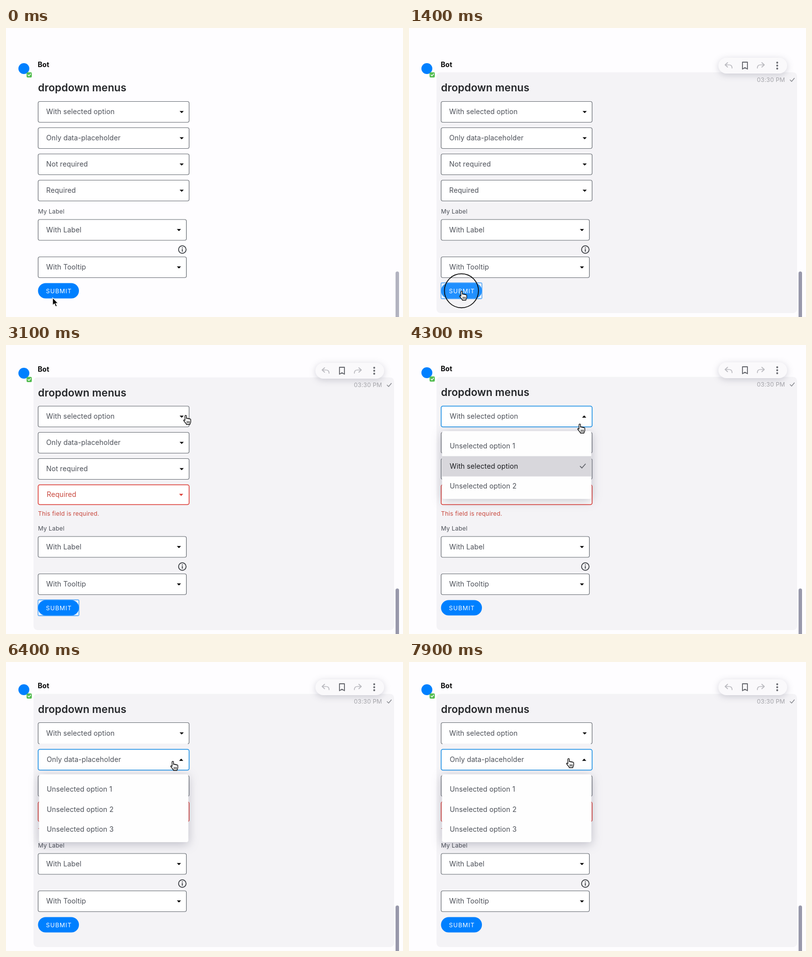
These frames come from a looping animation (800 px wide and 584 px high, 8000 ms). An HTML page:

```html
<!DOCTYPE html>
<html lang="en">
<head>
<meta charset="utf-8">
<title>Dropdown menus</title>
<style>
html, body { margin: 0; width: 100%; height: 100%; overflow: hidden; background: #fefdff; }
svg { display: block; width: 100%; height: 100%; }
text { font: 14px Inter, "Open Sans", sans-serif; letter-spacing: .1px; white-space: pre; }
.small { font-size: 12px; letter-spacing: .2px; }
.name { font-weight: 700; }
.title { font-size: 21px; font-weight: 600; }
.button { font-size: 12px; letter-spacing: 1px; }
.line { fill: none; stroke-linecap: round; stroke-linejoin: round; }
.bar { filter: drop-shadow(0 3px 7px rgba(40, 40, 70, .2)); }
.menu { filter: drop-shadow(0 4px 10px rgba(40, 40, 70, .27)); }
</style>
</head>
<body>
<svg id="stage" viewBox="0 0 800 584"></svg>
<script>
const stage = document.getElementById('stage');
const LOOP = 8000, STEP = 100;
const INK = '#4c5058', EDGE = '#676c73', RED = '#dc3b34', BLUE = '#0080ff', FOCUS = '#158ce4';

// Moments of the story, in ms
const HOVER = 100, ERROR = 1500, OPEN_1 = 3700, CLOSE_1 = 5400, OPEN_2 = 5900;
const CLICKS = [1200, 3300, 5200, 5600];
const CLICK_TIME = 300;

// Pointer path: time, x, y
const PATH = [
  [0, 94, 545], [500, 106, 531], [1900, 106, 531], [2100, 90, 410], [2200, 80, 312],
  [2500, 150, 326], [2900, 52, 327], [3100, 362, 141.5], [3600, 362, 141.5], [4100, 344, 159],
  [5400, 344, 159], [5600, 336, 200], [7200, 336, 200], [7900, 321.5, 194.5]
];

const within = (t, a, b) => t >= a && t < b;

function pointer(t) {
  const i = PATH.findIndex(k => k[0] > t);
  if (i < 0) return PATH[PATH.length - 1].slice(1);
  if (i === 0) return PATH[0].slice(1);
  const [a, b] = [PATH[i - 1], PATH[i]];
  const u = (t - a[0]) / (b[0] - a[0]);
  return [a[1] + (b[1] - a[1]) * u, a[2] + (b[2] - a[2]) * u];
}

const text = (x, y, s, fill = INK, style = '') =>
  `<text x="${x}" y="${y}" fill="${fill}" class="${style}">${s}</text>`;
const rect = (x, y, w, h, r, fill, extra = '') =>
  `<rect x="${x}" y="${y}" width="${w}" height="${h}" rx="${r}" fill="${fill}" ${extra}/>`;
const line = (d, color, width) =>
  `<path class="line" d="${d}" stroke="${color}" stroke-width="${width}"/>`;
const at = (x, y, s) => `<g transform="translate(${x} ${y})">${s}</g>`;

function caret(x, y, up, color) {
  const k = up ? -1 : 1;
  return `<path d="M${x - 4.2} ${y - 2 * k}h8.4L${x} ${y + 2.4 * k}z" fill="${color}"/>`;
}

function field({ y, label, w = 304.5, h = 42, state = '', hot }) {
  const open = state === 'open', error = state === 'error', focus = state === 'focus';
  const shift = open || error;
  const edge = error ? RED : open ? FOCUS : focus ? '#1260ba' : hot ? '#35393e' : EDGE;
  return rect(64.75, y, w - .25, h, 3.5, '#fff', `stroke="${edge}" stroke-width="${shift || focus ? 1.5 : 1.2}"`)
    + text(shift ? 82 : 81, y + h / 2 + 4.5, label, error ? '#c8473d' : INK)
    + caret(64.5 + w - (shift ? 16 : 15), y + h / 2 + .2, open, error ? RED : '#000');
}

function menu(y, items, picked) {
  let s = rect(66.5, y, 301, 137, 4, '#fefefe', 'class="menu"');
  items.forEach((label, i) => {
    const mid = y + 30 + i * 40.6;
    if (i === picked) {
      s += rect(66.5, mid - 20, 301, 41, 0, '#d8d7dc')
        + line(`M345 ${mid + .5}l3.5 3.5 7-8`, '#5a5d64', 1.5);
    }
    s += text(82, mid + 5, label, i === picked ? '#1b1d20' : INK);
  });
  return s;
}

function toolbar(y) {
  const reply = 'M-2-6L-7-1.5-2 3M-7-1.5H1Q7-1.5 7 5';
  const dots = [-6, 0, 6].map(d => `<circle cy="${d}" r="1.9" fill="#66686e"/>`).join('');
  return rect(623.5, y - 16, 138.5, 32, 16, '#faf9fb', 'class="bar"')
    + at(644, y, line(reply, '#bbbbc0', 1.7))
    + at(677, y, line('M-5-7H5V7L0 4-5 7z', '#66686e', 1.8))
    + at(709, y, `<g transform="scale(-1 1)">${line(reply, '#bbbbc0', 1.7)}</g>`)
    + at(742, y, dots);
}

function header(t, lift) {
  const nameLift = lift && lift + 1;
  let s = '';
  if (t >= HOVER) {
    s += rect(55.5, 89.5 - lift, 726.5, 486.5 + lift, 8, '#f4f3f6')
      + text(701, 108.5 - lift, '03:30 PM', '#a6a6ab', 'small')
      + line(`M768 ${105 - lift}l3 3 5.5-6.5`, '#84868c', 1.4)
      + toolbar(76 - lift);
  }
  return s + at(0, -nameLift,
      `<circle cx="36" cy="82" r="11" fill="${BLUE}"/>`
      + rect(41.5, 89.5, 10.5, 10.5, 2, '#55bd52')
      + line('M44.2 94.8l2 2 3.6-4', '#fff', 1.4)
      + text(64, 79, 'Bot', '#0a0a0b', 'name'))
    + text(64.5, 128 - lift, 'dropdown menus', '#232528', 'title')
    + rect(785, 492, 7, 100, 3.5, t < HOVER ? '#b2b3c0' : '#9898ab');
}

function submit(t, y) {
  const over = within(t, HOVER, 2000) && y > 514;
  let s = '';
  if (within(t, CLICKS[0], CLICKS[1])) {
    s += rect(64.5, 515, 82.5, 32, 2.5, '#e9f2fc', 'stroke="#6fb3f7" stroke-width="1.8"');
  }
  return s + rect(64.5, 515.5, 82.5, 31, 15.5, over ? '#2090ff' : BLUE)
    + text(80.5, 535.5, 'SUBMIT', '#fff', 'button');
}

function cursor(t, x, y) {
  if (t < HOVER || within(t, 2000, 3100)) {
    return at(x, y, '<path d="M0 0V15.5L3.6 12.2 6 18 8.8 16.9 6.3 11.3H11z" fill="#000" stroke="#fff" stroke-width="1.1"/>');
  }
  return at(x - 5, y, '<path d="M3.6 2.2c0-2 3-2 3 0v5c.3-1.2 2.6-1 2.8.4.5-1 2.6-.8 2.7.6.7-.8 3.2-.4 3.2 1.2v4c0 2-1.5 3-1.7 5.6H6.6C6 16.5 3.4 14.6 1.2 11.6.2 10 2 9 3.6 11z" fill="#fff" stroke="#000" stroke-width="1.3" stroke-linejoin="round"/>'
    + line('M7.8 12.5v3.8M10.1 12.5v3.8M12.4 12.5v3.8', '#000', 1));
}

function render(t) {
  const [x, y] = pointer(t);
  const trail = pointer(Math.max(0, t - STEP))[1];
  const error = t >= ERROR, up = error ? 25 : 0;
  const lift = t >= OPEN_1 ? 25 : error ? 24 : 0;
  const first = within(t, OPEN_1, CLOSE_1), second = t >= OPEN_2, closed = t >= CLOSE_1;
  const hot = top => trail > top && trail < top + 42;

  let s = header(t, lift);
  s += field({
    y: closed ? 122.5 : 148.5 - up, h: closed ? 43 : 42, label: 'With selected option',
    state: first ? 'open' : within(t, CLICKS[1], OPEN_1) ? 'focus' : ''
  });
  if (closed) s += rect(67.5, 164.8, 299, 1.6, 0, '#f4f3f6');
  s += field({
    y: 201.5 - up, label: 'Only data-placeholder',
    state: second ? 'open' : t >= CLICKS[3] ? 'focus' : ''
  });
  s += field({ y: 254.5 - up, label: 'Not required' });
  s += field({ y: 307.5 - up, label: 'Required', h: error ? 40 : 42, state: error ? 'error' : '' });
  if (error) s += text(64.5, 344.5, 'This field is required.', '#c8473d', 'small');

  s += text(64.5, 375, 'My Label', INK, 'small')
    + field({ y: 387, label: 'With Label', w: 299, hot: hot(387) })
    + '<circle cx="355.3" cy="447.8" r="7.6" fill="none" stroke="#3d4045" stroke-width="1.7"/>'
    + line('M355.3 447.3v4', '#3d4045', 1.8)
    + '<circle cx="355.3" cy="444.3" r="1.1" fill="#3d4045"/>'
    + field({ y: 462.5, label: 'With Tooltip', w: 299, hot: hot(462.5) })
    + submit(t, y);

  if (first) s += menu(174, ['Unselected option 1', 'With selected option', 'Unselected option 2'], 1);
  if (second) s += menu(227, [1, 2, 3].map(n => 'Unselected option ' + n));

  const click = CLICKS.find(c => within(t, c, c + CLICK_TIME));
  if (click !== undefined) {
    const r = Math.min(34.3, 18 + (t - click) * .0815);
    s += `<circle cx="${x - .3}" cy="${y}" r="${r}" fill="none" stroke="#0a0a0a" stroke-width="1.7"/>`;
  }
  stage.innerHTML = s + cursor(t, x, y);
}

let start, last = -1;
function tick(now) {
  start ??= now;
  const t = Math.floor(((now - start) % LOOP) / STEP) * STEP;
  if (t !== last) render(last = t);
  requestAnimationFrame(tick);
}
render(0);
requestAnimationFrame(tick);
</script>
</body>
</html>
```
